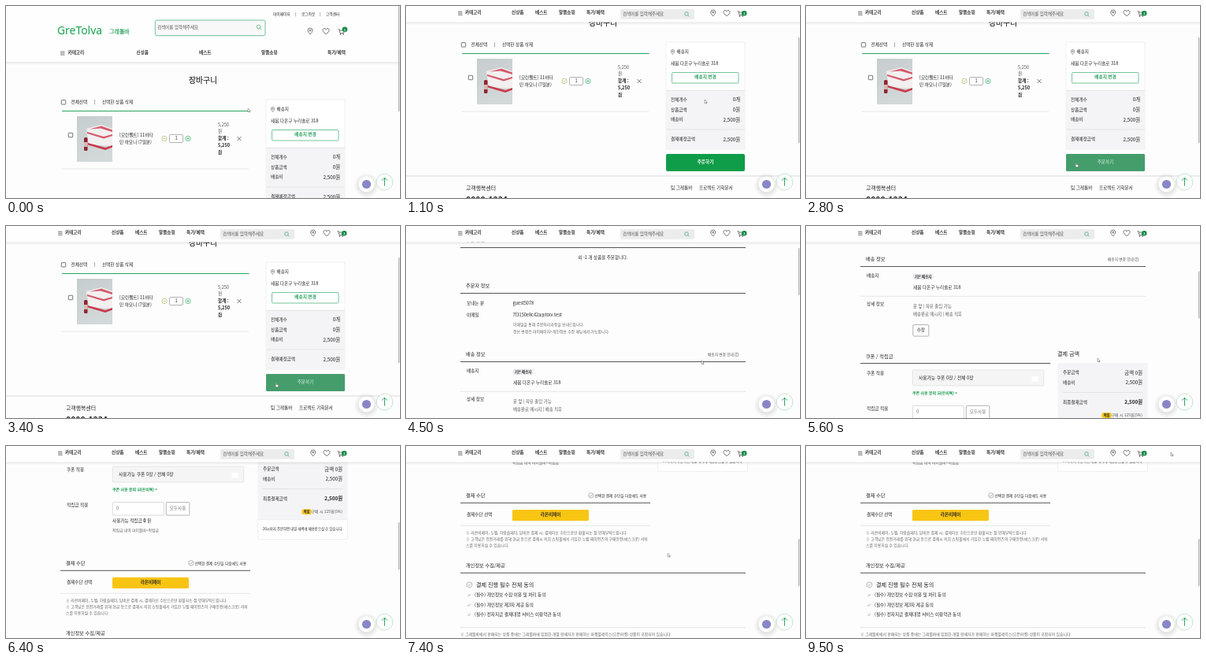
Recreate the animation shown at these times as an HTML page. Size 500x244 px, loop 9600 ms.

```html
<!DOCTYPE html>
<html lang="ko">
<head>
<meta charset="utf-8">
<title>장바구니</title>
<style>
html, body { margin: 0; width: 100%; height: 100%; overflow: hidden; background: #fdfdfd; }
svg { display: block; width: 100vw; height: 100vh; }
text {
  font: 5.6px "Noto Sans CJK KR", "Noto Sans CJK", "Noto Sans", sans-serif;
  fill: #222; dominant-baseline: central; transform: translateY(-.07em);
}
.logo { font: 13.9px "Noto Sans", sans-serif; fill: #16a34f; }
.title { font-size: 9.8px; }
.sec { font-size: 6.2px; }
.big { font-size: 7.1px; }
.won { font-size: 6.3px; }
.note { font-size: 4.85px; fill: #666; }
.tiny { font-size: 4.7px; }
.b { font-weight: 700; }
.m { stroke: #222; stroke-width: .14; }
.g { fill: #12994b; }
.g.m { stroke: #12994b; }
.mute { fill: #777; }
.soft { fill: #555; }
.w { fill: #fff; }
.c { text-anchor: middle; }
.r { text-anchor: end; }
.ink { fill: none; stroke: #333; stroke-width: .65; }
.green { fill: none; stroke: #2ba562; stroke-width: .65; }
.rule { fill: none; stroke: #555; stroke-width: 1; }
.thin { fill: none; stroke: #ddd; stroke-width: .7; }
.box { fill: #fff; stroke: #e6e6e6; stroke-width: .6; }
.panel { fill: #f4f4f6; }

/* One shared 9.6 s clock; each segment advances in 100 ms steps. */
.cart, .order, .bar1, .bar2, .compact, .hover, .pointer, .arrow, .hand, .show1, .show2 {
  animation: 9.6s infinite step-end;
}
.cart { animation-name: cart; }
.order { animation-name: order; }
.bar1 { animation-name: bar1; }
.bar2 { animation-name: bar2; }
.compact { animation-name: compact; }
.hover, .hand { animation-name: hover; }
.arrow { animation-name: arrow; }
.pointer { animation-name: pointer; }
.show1 { animation-name: show1; }
.show2 { animation-name: show2; }
@keyframes show1 { 0% { opacity: 1 } 39.58%, 100% { opacity: 0 } }
@keyframes show2 { 0% { opacity: 0 } 39.58%, 100% { opacity: 1 } }
@keyframes hover { 0% { opacity: 0 } 17.7% { opacity: 1 } 39.58%, 100% { opacity: 0 } }
@keyframes arrow {
  0% { opacity: 1 } 17.7% { opacity: 0 } 39.58% { opacity: 1 }
  64.58% { opacity: 0 } 75%, 100% { opacity: 1 }
}
@keyframes compact {
  0% { opacity: 0 } 7.29% { opacity: 1 } 39.58% { opacity: 0 } 43.74%, 100% { opacity: 1 }
}
@keyframes cart {
  0% { transform: none; animation-timing-function: steps(10) }
  10.41%, 100% { transform: translateY(-73px) }
}
@keyframes bar1 {
  0% { transform: none; animation-timing-function: steps(10) }
  10.41%, 100% { transform: translateY(40px) }
}
@keyframes order {
  0%, 39.58% { transform: translateY(0); animation-timing-function: steps(7) }
  46.87% { transform: translateY(-114px); animation-timing-function: steps(11) }
  58.33% { transform: translateY(-235px) }
  59.37% { transform: translateY(-235px); animation-timing-function: steps(4) }
  63.54% { transform: translateY(-340px) }
  64.58% { transform: translateY(-340px); animation-timing-function: steps(2) }
  66.66% { transform: translateY(-392px); animation-timing-function: steps(5) }
  71.87%, 100% { transform: translateY(-478px) }
}
@keyframes bar2 {
  0%, 39.58% { transform: translateY(0); animation-timing-function: steps(7) }
  46.87% { transform: translateY(28px); animation-timing-function: steps(11) }
  58.33% { transform: translateY(57.5px) }
  59.37% { transform: translateY(57.5px); animation-timing-function: steps(4) }
  63.54% { transform: translateY(84px) }
  64.58% { transform: translateY(84px); animation-timing-function: steps(2) }
  66.66% { transform: translateY(97px); animation-timing-function: steps(5) }
  71.87%, 100% { transform: translateY(118px) }
}
@keyframes pointer {
  0% { transform: translate(307px, 130px); animation-timing-function: steps(11) }
  11.45% { transform: translate(379px, 119px); animation-timing-function: steps(7) }
  18.74% { transform: translate(342px, 199px) }
  39.58% { transform: translate(342px, 199px); animation-timing-function: steps(7) }
  46.87% { transform: translate(375px, 171px); animation-timing-function: steps(11) }
  58.33% { transform: translate(370px, 168px) }
  74.99% { transform: translate(370px, 150px); animation-timing-function: steps(9) }
  84.37% { transform: translate(200px, 88px) }
  89.58% { transform: translate(200px, 88px); animation-timing-function: steps(9) }
  98.95%, 100% { transform: translate(463px, 8px) }
}
</style>
</head>
<body>
<svg viewBox="0 0 500 244">
<defs>
  <linearGradient id="shade" x2="0" y2="1">
    <stop stop-color="#000" stop-opacity=".08"/><stop offset="1" stop-color="#000" stop-opacity="0"/>
  </linearGradient>
  <linearGradient id="photo" x2=".4" y2="1">
    <stop stop-color="#c6cdcf"/><stop offset="1" stop-color="#d3d8d9"/>
  </linearGradient>
  <radialGradient id="glow">
    <stop offset=".2" stop-color="#000" stop-opacity=".2"/><stop offset="1" stop-color="#000" stop-opacity="0"/>
  </radialGradient>
  <g id="menu" class="ink"><path d="M0-2H5.5M0 0H5.5M0 2H5.5"/></g>
  <g id="lens" class="green"><circle cx="-.5" cy="-.5" r="2.3"/><path d="M1.2 1.2L3 3"/></g>
  <g id="pin" class="ink"><path d="M0 4C-1.5 2-3 .6-3-1A3 3 0 0 1 3-1C3 .6 1.5 2 0 4Z"/><circle cy="-1" r="1"/></g>
  <path id="heart" class="ink" d="M0 3.7C-6-.4-4-3.6-2-3.6-.8-3.6 0-2.4 0-2 0-2.4 .8-3.6 2-3.6 4-3.6 6-.4 0 3.7Z"/>
  <g id="basket">
    <path class="ink" d="M-4-3.5H-2.6L-1.5 1.5H3L4-2H-2.3"/>
    <circle cx="-1" cy="3" r=".8" fill="#333"/><circle cx="2.6" cy="3" r=".8" fill="#333"/>
  </g>
  <g id="badge">
    <circle r="3.3" fill="#0f8a45"/>
    <text class="w c b" y=".2" style="font-size:4px">1</text>
  </g>
  <rect id="check" class="ink" x="-2.7" y="-2.7" width="5.4" height="5.4" rx=".6"/>
  <path id="tick" d="M-1.8 0L-.5 1.4 2-1.5" fill="none" stroke="#777" stroke-width=".6"/>

  <g id="head">
    <rect width="500" height="71" fill="#fefefe"/>
    <rect y="71" width="500" height="4" fill="url(#shade)"/>
    <text class="logo" x="65" y="31">GreTolva</text>
    <text class="g m" x="131" y="32" style="font-size:7px">그레톨바</text>
    <rect class="green" x="189.3" y="18" width="139.7" height="19.7" rx="2.5" style="fill:#f8f8f8"/>
    <text class="soft" x="192" y="27.5" style="font-size:5.5px">검색어를 입력해주세요</text>
    <use href="#lens" x="321" y="27"/>
    <text class="tiny" x="339" y="10">마이페이지</text><text class="tiny c" x="368" y="10">|</text>
    <text class="tiny" x="375" y="10">로그아웃</text><text class="tiny c" x="399" y="10">|</text>
    <text class="tiny" x="406" y="10">고객센터</text>
    <use href="#pin" x="386" y="32"/><use href="#heart" x="406" y="32"/>
    <use href="#basket" x="425.5" y="33"/><use href="#badge" x="430" y="29.7"/>
    <use href="#menu" x="69" y="60"/>
    <text class="m" x="78.5" y="59.5">카테고리</text>
    <text class="m" x="165.5" y="59">신상품</text><text class="m" x="245" y="59">베스트</text>
    <text class="m" x="324" y="59">알뜰쇼핑</text><text class="m" x="408" y="59">특가/혜택</text>
  </g>
</defs>

<rect width="500" height="244" fill="#fdfdfd"/>

<g class="show1"><g class="cart">
  <use href="#head"/>
  <text class="title m c" x="250" y="94.7">장바구니</text>
  <use href="#check" x="73" y="122.3"/>
  <text x="82.5" y="122.5">전체선택</text><text class="c" x="112.5" y="122.5">|</text>
  <text x="122" y="122.5">선택한 상품 삭제</text>
  <path class="green" d="M71 133.5H308.5" style="stroke-width:1.1"/>
  <use href="#check" x="82" y="164"/>
  <g>
    <rect x="90" y="140" width="45" height="58" fill="url(#photo)"/>
    <path d="M102 156L121 151 135 156V178L105 176Z" fill="#f1efef"/>
    <path d="M106 156.5L121 152.5 135 157.5V160L120 155.5ZM103 160L124 166 135 163V165L124 168.5 103 162Z" fill="#d4596a"/>
    <path d="M104 174L126 180 135 177V179.5L126 183 104 176.5Z" fill="#c93a4c"/>
    <rect x="99" y="167" width="4.5" height="17" rx="1.5" fill="#8d2630"/>
    <rect x="99" y="173" width="4.5" height="6" fill="#d9b9ba"/>
  </g>
  <text x="144" y="164">[모린펠트] 11비타</text>
  <text x="144" y="173">민 하모니 (7일분)</text>
  <g class="green">
    <path d="M199.3 168.5H202.7M204.2 168.5A3.2 3.2 0 1 1 197.8 168.5 3.2 3.2 0 0 1 204.2 168.5" style="stroke:#a5b55c"/>
    <circle cx="231" cy="168.5" r="3.2"/><path d="M229.3 168.5H232.7M231 166.8V170.2"/>
  </g>
  <rect class="ink" x="207.5" y="163.5" width="17" height="10" rx="1" style="fill:#fff;stroke:#888"/>
  <text class="c" x="216" y="168.7">1</text>
  <text class="soft" x="269" y="151">5,250</text><text class="soft" x="269" y="159.7">원</text>
  <text class="b" x="269" y="168.5">합계 :</text><text class="b" x="269" y="177.2">5,250</text><text class="b" x="269" y="186">원</text>
  <path class="ink" d="M293.5 166L298.5 171M298.5 166L293.5 171"/>
  <path class="thin" d="M71 207H308"/>

  <rect class="box" x="330" y="119" width="100" height="136"/>
  <rect class="panel" x="330" y="180" width="100" height="75"/>
  <path class="thin" d="M330 180.3H430M330 230H430"/>
  <use href="#pin" transform="translate(338.5 131.5) scale(.75)"/>
  <text x="343.5" y="131.3">배송지</text>
  <text x="336" y="146">새봄 다온구 누리솔로 318</text>
  <rect class="green" x="337.5" y="157.5" width="84.5" height="13.5" rx="1.5" style="fill:#fff"/>
  <text class="g m c" x="380" y="163.8">배송지 변경</text>
  <text x="336" y="192">전체개수</text><text class="won r" x="424" y="192">0개</text>
  <text x="336" y="205">상품금액</text><text class="won r" x="424" y="205">0원</text>
  <text x="336" y="217.5">배송비</text><text class="won r" x="424" y="217.5">2,500원</text>
  <text x="336" y="242.5">결제예정금액</text><text class="won r" x="424" y="242.5">2,500원</text>
  <rect x="330" y="261" width="100" height="22" rx="2" fill="#0f9d49"/>
  <text class="w b c" x="380" y="271.5">주문하기</text>
  <g class="hover">
    <rect x="330" y="261" width="100" height="22" rx="2" fill="#459d6c"/>
    <text class="c" x="380" y="271.5" style="fill:#dcf0e4">주문하기</text>
  </g>
  <path class="thin" d="M0 289H500" style="stroke:#ccc"/>
  <text x="76" y="304.7" style="font-size:6.9px">고객행복센터</text>
  <text class="b" x="76" y="319" style="font-size:10.4px">0000-1234</text>
  <text x="336" y="304.7">팀 그레톨바</text><text x="372" y="304.7">프로젝트 기획문서</text>
</g></g>

<g class="show2"><g class="order">
  <use href="#head"/>
  <text class="title m c" x="250" y="94.7">주문서</text>
  <text class="sec" x="76" y="132">주문 상품</text>
  <path class="rule" d="M69 141.5H431"/>
  <text class="c" x="250" y="154.3" style="font-size:5.5px">외 -1 개 상품을 주문합니다.</text>

  <text class="sec" x="76" y="190">주문자 정보</text>
  <path class="rule" d="M69 199.5H431"/>
  <text x="77" y="212.5">보내는 분</text><text x="135.5" y="212.5">guest5078</text>
  <text x="77" y="227">이메일</text><text x="135.5" y="227">7f3150e8c42a@tolv.test</text>
  <text class="note" x="136" y="238.7">이메일을 통해 주문처리과정을 보내드립니다.</text>
  <text class="note" x="136" y="247.5">정보 변경은 마이페이지&gt;개인정보 수정 메뉴에서 가능합니다.</text>

  <text class="sec" x="76" y="277.2">배송 정보</text>
  <text class="tiny soft" x="383" y="277.3">배송지 변경 안내</text>
  <circle class="ink" cx="419.7" cy="277.4" r="2.4" style="stroke-width:.4"/>
  <text class="c" x="419.7" y="277.6" style="font-size:3.6px">?</text>
  <path class="rule" d="M69 286.5H431"/>
  <text x="77" y="298.8">배송지</text>
  <rect x="135.5" y="295.8" width="26" height="7.5" rx="3" fill="#e9e9eb"/>
  <text class="m c" x="148.5" y="299.6" style="font-size:4.4px">기본 배송지</text>
  <text x="136" y="313.3">새봄 다온구 누리솔로 318</text>
  <path class="thin" d="M69 324.3H431"/>
  <text x="77" y="334.3">상세 정보</text>
  <text class="soft" x="136" y="337" style="font-size:5.4px">문 앞 | 자유 출입 가능</text>
  <text class="soft" x="136" y="347" style="font-size:5.4px">배송완료 메시지 | 배송 직후</text>
  <rect class="ink" x="135.8" y="360.5" width="20" height="14.5" rx="1.5" style="fill:#fff;stroke:#888"/>
  <text class="c" x="145.8" y="367.7">수정</text>

  <text class="sec" x="76" y="400.5">쿠폰 / 적립금</text>
  <path class="rule" d="M69 409.5H310"/>
  <text x="77" y="422.3">쿠폰 적용</text>
  <rect class="thin" x="135.3" y="418" width="166.5" height="20" rx="1.5" style="fill:#f5f5f6"/>
  <text x="143" y="427.7" style="font-size:5.75px">사용가능 쿠폰 0장 / 전체 0장</text>
  <rect x="286.5" y="426" width="8" height="7" rx="1" fill="#fff"/>
  <text class="g m" x="135" y="447" style="font-size:4.95px">쿠폰 사용 문의 (라온비톡) &gt;</text>
  <text x="77" y="467.5">적립금 적용</text>
  <rect class="thin" x="135.3" y="463.5" width="65" height="16.5" rx="1" style="fill:#fff;stroke:#ccc"/>
  <text class="mute" x="140" y="471.5">0</text>
  <rect class="thin" x="203.3" y="463.5" width="29.5" height="16.5" rx="1" style="fill:#fff;stroke:#999"/>
  <text class="mute c" x="218" y="471.5">모두사용</text>
  <text x="135" y="487">사용가능 적립금 <tspan class="b">0</tspan> 원</text>
  <text class="note" x="135" y="498.5">적립금 내역 마이톨바&gt;적립금</text>

  <text class="big" x="319" y="397.2">결제 금액</text>
  <rect class="panel" x="319.5" y="409" width="114" height="76"/>
  <text x="326" y="421.5">주문금액</text><text class="won r" x="427" y="421.5">금액 0원</text>
  <text x="326" y="434">배송비</text><text class="won r" x="427" y="434">2,500원</text>
  <path class="thin" d="M326 446.5H427"/>
  <text x="326" y="459">최종결제금액</text><text class="won b r" x="427" y="459">2,500원</text>
  <rect x="375.3" y="472.3" width="12.5" height="6.6" rx="2.5" fill="#f7c51c"/>
  <text class="b c" x="381.5" y="475.6" style="font-size:4.2px">적립</text>
  <text class="soft r" x="427" y="475.3" style="font-size:4.9px">구매 시 125원(5%)</text>
  <rect class="box" x="319.8" y="485.3" width="113.4" height="25"/>
  <text x="326" y="497.3" style="font-size:4.37px">20시까지 주문하면 내일 새벽에 배송받으실 수 있습니다.</text>

  <text class="sec" x="76" y="541">결제 수단</text>
  <circle class="ink" cx="234.8" cy="540.8" r="3.2" style="stroke:#777;stroke-width:.5"/><use href="#tick" x="234.8" y="540.8"/>
  <text class="tiny" x="239.5" y="541.3">선택한 결제 수단을 다음에도 사용</text>
  <path class="rule" d="M69 550.3H310"/>
  <text x="77" y="565.5">결제수단 선택</text>
  <rect x="135" y="559" width="97" height="14" rx="1.5" fill="#f8c512"/>
  <text class="m c" x="183.5" y="565.5">라온비페이</text>
  <path class="thin" d="M69 579.3H310"/>
  <text class="note" x="76" y="588">※ 라온비페이, 누벨, 하람솔페이, 담비온 결제 시, 결제하신 수단으로만 환불되는 점 양해부탁드립니다.</text>
  <text class="note" x="76" y="595.8">※ 고객님은 안전거래를 위해 현금 등으로 결제시 저희 쇼핑몰에서 가입한 누벨 페이먼츠의 구매안전(에스크로) 서비</text>
  <text class="note" x="76" y="603.7">스를 이용하실 수 있습니다.</text>

  <text class="sec" x="76" y="630">개인정보 수집/제공</text>
  <path class="rule" d="M69 639.3H431"/>
  <circle class="ink" cx="80.5" cy="654.3" r="3.5" style="stroke:#777;stroke-width:.5"/><use href="#tick" x="80.5" y="654.3"/>
  <text class="big" x="89" y="654.3">결제 진행 필수 전체 동의</text>
  <use href="#tick" x="80" y="667.5"/><text x="87" y="667.5">(필수) 개인정보 수집·이용 및 처리 동의</text>
  <use href="#tick" x="80" y="680"/><text x="87" y="680">(필수) 개인정보 제3자 제공 동의</text>
  <use href="#tick" x="80" y="692.3"/><text x="87" y="692.3">(필수) 전자지급 결제대행 서비스 이용약관 동의</text>
  <path class="thin" d="M69 708.7H431"/>
  <text class="note" x="69" y="717">※ 그레톨바에서 판매되는 상품 중에는 그레톨바에 입점한 개별 판매자가 판매하는 마켓플레이스(오픈마켓) 상품이 포함되어 있습니다.</text>
</g></g>

<g class="compact">
  <rect width="500" height="20.5" fill="#fefefe"/>
  <rect y="20.5" width="500" height="4" fill="url(#shade)"/>
  <use href="#menu" x="66" y="9.3"/>
  <text class="m" x="75" y="8.7">카테고리</text>
  <text class="m" x="134" y="8.7">신상품</text><text class="m" x="164" y="8.7">베스트</text>
  <text class="m" x="194" y="8.7">알뜰쇼핑</text><text class="m" x="229" y="8.7">특가/혜택</text>
  <rect x="272" y="4" width="94" height="12.7" rx="1" fill="#ececec"/>
  <text class="soft" x="275" y="10.2" style="font-size:5.5px">검색어를 입력해주세요</text>
  <use href="#lens" x="356.5" y="10.5"/>
  <use href="#pin" x="389.7" y="9"/><use href="#heart" x="407" y="9"/>
  <use href="#basket" x="424.5" y="10"/><use href="#badge" x="429.2" y="9.3"/>
</g>

<circle cx="457.5" cy="228" r="16" fill="url(#glow)"/>
<circle cx="457.5" cy="226.5" r="10" fill="#fff"/>
<circle cx="457.5" cy="226.5" r="5.6" fill="#8a86c6"/>
<circle cx="480.5" cy="223.6" r="10.4" fill="#fff" stroke="#a9d8bd" stroke-width=".7"/>
<path class="green" d="M480.5 228.7V218.4M477 221.7L480.5 218.1 484 221.7" style="stroke-width:1"/>

<g fill="#b0b0b0">
  <g class="show1"><rect class="bar1" x="498" width="1.3" height="134" rx=".6"/></g>
  <g class="show2"><rect class="bar2" x="498" width="1.3" height="60" rx=".6"/></g>
</g>

<g class="pointer" fill="#fff" stroke="#333" stroke-width=".4">
  <path class="arrow" d="M0 0V4.6L1.1 3.7 1.9 5.2 2.6 4.9 1.9 3.4H3.3Z"/>
  <path class="hand" d="M.3.3Q.9-.2 1.3.5V2.3L3.5 2.9Q4 3.2 3.8 4L3.3 5.8H1L-.8 3.7Q-.5 3 .3 3.6Z"/>
</g>
</svg>
</body>
</html>
```
